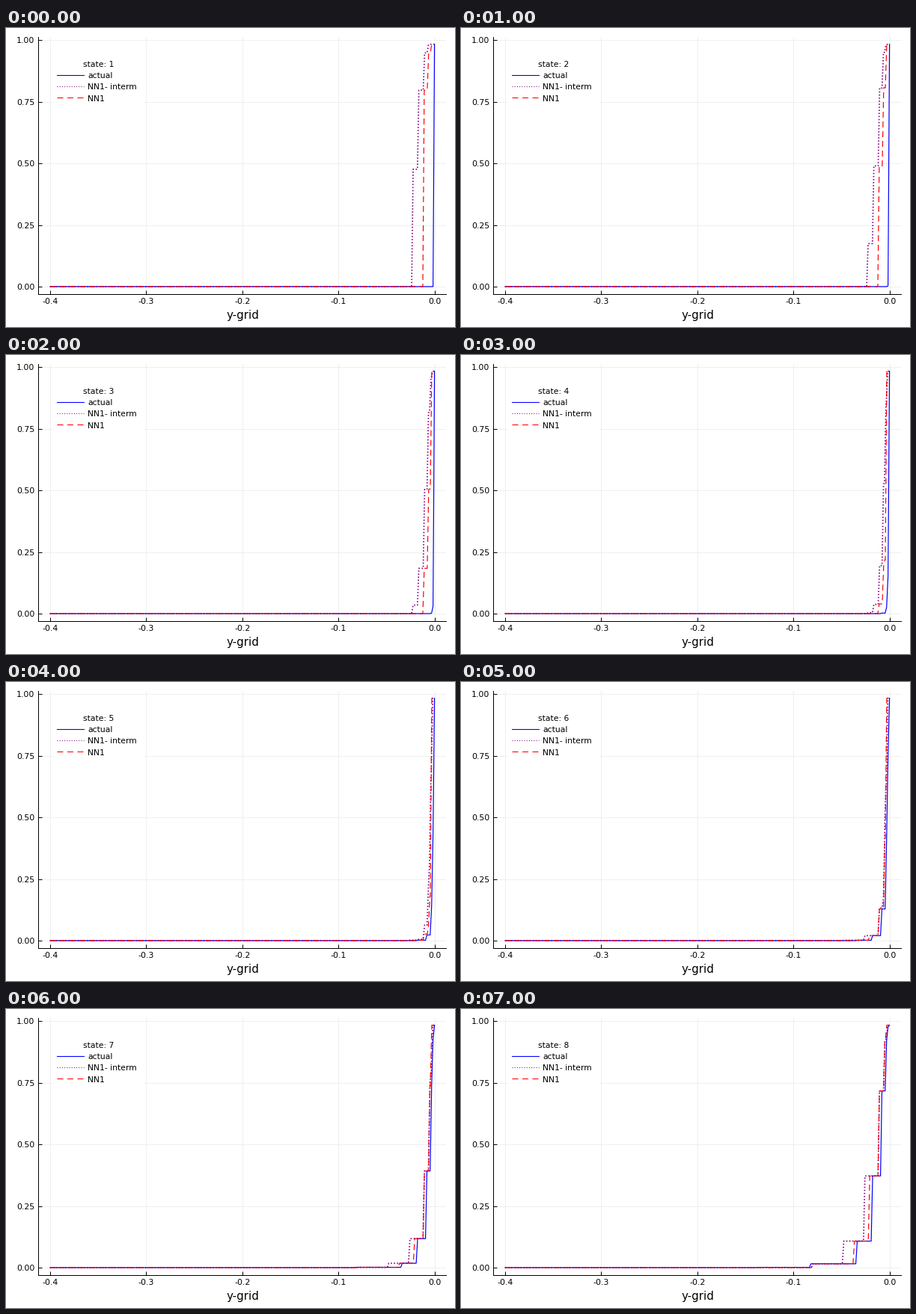
Write a matplotlib script that moves like this. It is 600 px wide and 400 px high and loops after 8000 ms.

```python
from math import erf, sqrt

import matplotlib.pyplot as plt
import numpy as np
from matplotlib.animation import FuncAnimation
from matplotlib.lines import Line2D
from matplotlib.patches import Rectangle
from matplotlib.transforms import Affine2D

W, H, DPI = 600, 400, 100
PT = 72 / DPI  # points per pixel
TOP = 0.983
STATES = 8
RUNG = 0.92    # distance between neighbouring steps, in standard deviations
RAMP = 1.5     # width of a step's slope, in thousandths of the y-grid


def normal_cdf(z):
    return (1 + erf(z / sqrt(2))) / 2


def rising(state, k):
    return normal_cdf(-2.15 + RUNG * k + 0.867 * (state - STATES))


def falling(state, k):
    return normal_cdf(-0.04 + RUNG * k - 0.885 * (state - 1))


# Each curve adds up staircases: (height rule, first rung, jumps in thousandths).
ACTUAL = [(rising, -1, [-138, -82.5, -34.3, -18.3, -8.6, -3.75, -2.25, -0.75])]
INTERM = [(rising, 0, [-80.5, -48.3, -26.3, -11.2, -5.5, -2.6]),
          (falling, 0, [-23, -17, -11, -7, -4.4, -2.6])]
NN = [(rising, 0, [-80.5, -37.2, -21.3, -11.2, -5.5, -3.6]),
      (falling, 1, [-11.4, -6.8, -3.6])]


def staircase(state, rule, first, jumps):
    """Knots of a staircase whose last jump reaches 1."""
    steps = [rule(state, first + i) for i in range(len(jumps) - 1)]
    xs = np.add.outer(jumps, [-RAMP / 2, RAMP / 2]).ravel()
    ys = np.repeat([0, *steps, 1], 2)[1:-1]
    return xs, ys


def curve(state, parts):
    stairs = [staircase(state, *part) for part in parts]
    xs = np.unique(np.concatenate([[-400, 0], *(x for x, _ in stairs)]))
    total = sum(np.interp(xs, *stair) for stair in stairs)
    return xs / 1000, TOP * np.minimum(total, 1)


plt.rcParams["font.family"] = "DejaVu Sans"
plt.rcParams["lines.scale_dashes"] = False

fig = plt.figure(figsize=(W / DPI, H / DPI), dpi=DPI, facecolor="white")
pixels = Affine2D().scale(1 / W, -1 / H).translate(0, 1) + fig.transFigure

LEFT, RIGHT, UPPER, LOWER = 43, 588, 12, 355.6
ax = fig.add_axes([LEFT / W, 1 - LOWER / H, (RIGHT - LEFT) / W, (LOWER - UPPER) / H])
ax.set(xlim=(-0.4124, 0.012), ylim=(-0.0292, 1.0125))
ax.set_axisbelow(True)
ax.patch.set_visible(False)
ax.grid(color="#efefef", lw=PT)
ax.spines[["top", "right"]].set_visible(False)
for side in ("left", "bottom"):
    ax.spines[side].set_linewidth(PT)

x_ticks = np.linspace(-0.4, 0, 5)
y_ticks = np.linspace(0, 1, 5)
ax.set_xticks(x_ticks)
ax.set_yticks(y_ticks)
ax.tick_params(direction="in", length=5 * PT, width=PT,
               labelleft=False, labelbottom=False)


def label(x, y, text, ha="left", size=10.75):
    return ax.text(x, y, text, transform=pixels, ha=ha, va="baseline",
                   fontsize=size * PT, zorder=6)


for x in x_ticks:
    label(572.6 + x * 1284, 369, f"{x:.1f}", "center", 11)
for y in y_ticks:
    label(38.5, 350 - y * 329.9, f"{y:.2f}", "right", 11)
label(316, 389, "y-grid", "center", 15)


def dashes(on, off):
    return (0, (on * PT, off * PT))


# Name, parts, colour, curve dash, legend dash, curve width
SERIES = [
    ("actual", ACTUAL, "blue", "-", "-", 1.2),
    ("NN1- interm", INTERM, "purple", dashes(1.5, 2.6), dashes(1, 2.2), 1.8),
    ("NN1", NN, "red", dashes(8, 5), dashes(8, 5.5), 1.2),
]

ax.add_patch(Rectangle((63, 39), 122, 62, transform=pixels, fc="white", ec="none", zorder=4))
lines = []
for row, (name, parts, color, dash, key_dash, width) in enumerate(SERIES):
    y = 62.8 + 15.3 * row
    ax.add_line(Line2D([67.5, 103.5], [y, y], transform=pixels, color=color,
                       ls=key_dash, lw=1.1 * PT, zorder=5))
    label(109, y + 4.2, name)
    lines += ax.plot([], [], color=color, ls=dash, lw=width * PT, zorder=3 + row / 10)
title = label(103, 52, "")


def update(frame):
    state = frame + 1
    for line, (_, parts, *_) in zip(lines, SERIES):
        line.set_data(*curve(state, parts))
    title.set_text(f"state: {state}")
    return [*lines, title]


anim = FuncAnimation(fig, update, frames=STATES, interval=1000, repeat=True, repeat_delay=0)
plt.show()
```
